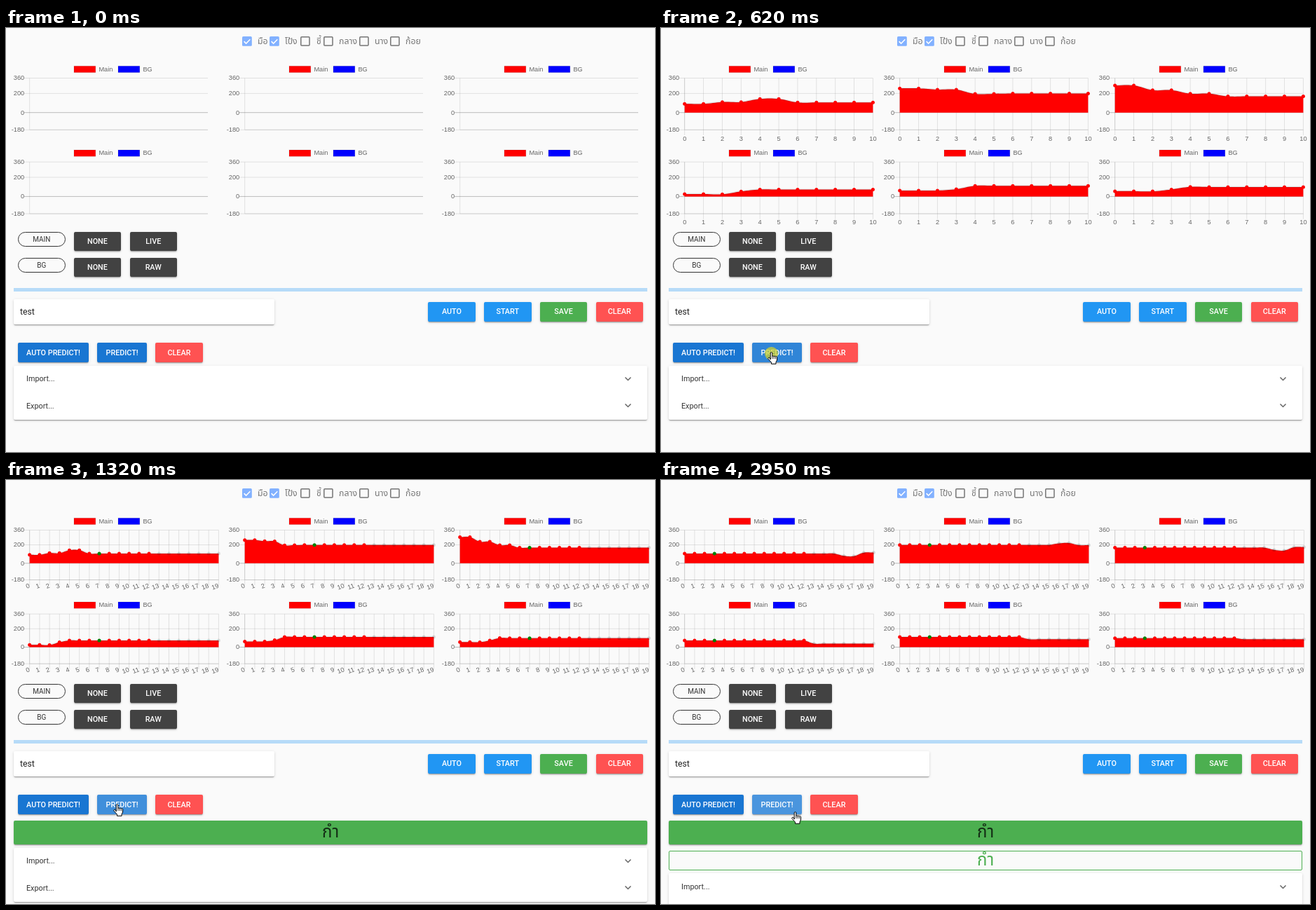
Animation of 926x605 px, one loop 3000 ms. Source, as an HTML page with a canvas:

```html
<!DOCTYPE html>
<html lang="th">
<head>
<meta charset="utf-8">
<title>Gesture prediction panel</title>
<style>
html, body { margin: 0; width: 926px; height: 605px; overflow: hidden; background: #fafafa; }
body { position: relative; font-family: Roboto, 'Noto Sans Thai', 'Noto Sans', sans-serif; }
canvas, svg, .b { position: absolute; left: 0; top: 0; }
.b { box-sizing: border-box; display: flex; align-items: center; justify-content: center; white-space: nowrap; }
.btn { border-radius: 2px; color: #fff; font-weight: 500; font-size: 10.8px; }
.up { box-shadow: 0 2px 1px -1px rgba(0,0,0,.2), 0 1.5px 1.5px rgba(0,0,0,.14), 0 1px 4px rgba(0,0,0,.12); }
.chip { border: 1px solid #333; border-radius: 11px; color: #333; font-size: 10px; }
.card { background: #fff; border-radius: 2px; }
.left { justify-content: flex-start; }
.thai { font-size: 12.3px; color: #757575; }
.item { font-size: 10.8px; color: rgba(0,0,0,.8); }
.alert { font-size: 24px; border-radius: 2px; }
</style>
</head>
<body>
<canvas id="charts" width="926" height="290"></canvas>
<script>
const LOOP = 3000;
const NS = 'http://www.w3.org/2000/svg';

// ---------- static interface ----------
function box(x, y, w, h, cls, text = '', css = '', parent = document.body) {
  const el = document.createElement('div');
  el.className = 'b ' + cls;
  el.textContent = text;
  el.style.cssText = `left:${x}px;top:${y}px;width:${w}px;height:${h}px;${css}`;
  parent.append(el);
  return el;
}
function svg(x, y, w, h, body, parent = document.body) {
  const el = document.createElementNS(NS, 'svg');
  el.setAttribute('width', w);
  el.setAttribute('height', h);
  el.style.cssText = `left:${x}px;top:${y}px;overflow:visible`;
  el.innerHTML = body;
  parent.append(el);
  return el;
}
const button = (x, y, w, text, color) => box(x, y, w, 27.7, 'btn up', text, `background:${color}`);

const checks = [[337, 359, 'มือ'], [376, 398, 'โป้ง'], [420, 443, 'ชี้'],
  [452.5, 475, 'กลาง'], [504, 526, 'นาง'], [547.5, 570, 'ก้อย']];
checks.forEach(([x, tx, label], i) => {
  svg(x, 12.3, 14, 14, i < 2
    ? '<rect width="13.8" height="13.8" rx="1.6" fill="#82b1ff"/><path d="M2.6 7.1l3 3 5.7-5.8" fill="none" stroke="#fff" stroke-width="1.5"/>'
    : '<rect x=".8" y=".8" width="12.2" height="12.2" rx="1" fill="none" stroke="#757575" stroke-width="1.5"/>');
  box(tx, 9, 40, 20, 'thai left', label);
});

box(17, 291, 67.5, 21, 'chip', 'MAIN');
box(17, 328, 67.5, 21, 'chip', 'BG');
button(96.7, 290.8, 67.5, 'NONE', '#424242');
button(176.5, 290.8, 67.5, 'LIVE', '#424242');
button(96.7, 327.6, 67.5, 'NONE', '#424242');
button(176.5, 327.6, 67.5, 'RAW', '#424242');
box(10.8, 370.6, 904.6, 5.4, '', '', 'background:#b6dbf8');
box(10.8, 387, 372, 36.4, 'card up left', 'test', 'padding-left:9.2px;font-size:12.3px;color:rgba(0,0,0,.87)');
button(602.2, 391, 67.5, 'AUTO', '#2196f3');
button(682, 391, 67.5, 'START', '#2196f3');
button(761.8, 391, 67.5, 'SAVE', '#4caf50');
button(841.5, 391, 67.5, 'CLEAR', '#ff5252');
button(16.8, 449.3, 101.4, 'AUTO PREDICT!', '#1976d2');
const predict = button(130.3, 449.3, 70.6, 'PREDICT!', '#1976d2');
button(213.2, 449.3, 67.5, 'CLEAR', '#ff5252');

const solid = box(10.8, 486.4, 904.6, 33.6, 'alert up', 'กำ', 'background:#4caf50;color:rgba(0,0,0,.75)');
const outline = box(10.8, 529.4, 904.6, 27.4, 'alert', 'กำ', 'border:1px solid #4caf50;color:#4caf50');
const panel = box(10.8, 481.6, 904.6, 77, 'card up');
['Import...', 'Export...'].forEach((text, i) => {
  box(18.2, i * 38.4, 200, 38.4, 'item left', text, '', panel);
  svg(872.4, 16.2 + i * 38.4, 9, 6, '<path d="M.5.5l4 4 4-4" fill="none" stroke="#666" stroke-width="1.5"/>', panel);
});

const ring = box(147.5, 454.5, 19, 19, '', '', 'border-radius:50%;background:rgba(214,212,40,.72)');
const hand = svg(0, 0, 15, 19,
  '<path d="M4.2 11V2a1.3 1.3 0 0 1 2.6 0V6.6a1.2 1.2 0 0 1 2.3.3 1.2 1.2 0 0 1 2.3.4 1.1 1.1 0 0 1 2.1.5V12L12 14.8V17.3H5.5V15.2L1 10.2a1.3 1.3 0 0 1 1.9-1.7Z" fill="#fff" stroke="#000" stroke-linejoin="round"/>' +
  '<path d="M6.8 6.6V10M9.1 7V10M11.4 7.4V10" stroke="#000" stroke-width=".8"/>');

// ---------- charts ----------
const ctx = document.getElementById('charts').getContext('2d');
// head: opening samples, the last one holds; tail: later samples from index `from`
const series = [
  { head: [91, 91, 110, 110, 142, 142, 105], from: 30, tail: [80, 76, 114, 116] },
  { head: [252, 252, 240, 239, 195, 196, 199], from: 30, tail: [215, 220, 197, 196] },
  { head: [283, 283, 234, 234, 197, 197, 169], from: 30, tail: [145, 138, 174, 176] },
  { head: [25, 25, 23, 53, 73, 72], from: 27, tail: [38] },
  { head: [62, 62, 62, 76, 111, 111], from: 27, tail: [86] },
  { head: [55, 55, 54, 73, 99, 98], from: 27, tail: [86] },
];
const last = (list, i) => list[Math.min(i, list.length - 1)];
const sample = (s, i) => i < s.from ? last(s.head, i) : last(s.tail, i - s.from);

function line(x1, y1, x2, y2, alpha = 0.1) {
  ctx.strokeStyle = `rgba(0,0,0,${alpha})`;
  ctx.lineWidth = 1;
  ctx.beginPath();
  ctx.moveTo(x1, y1);
  ctx.lineTo(x2, y2);
  ctx.stroke();
}

// Bezier handles of a smoothed line with tension 0.4
function handles(pts) {
  return pts.map((p, i) => {
    const a = pts[i - 1] || p, b = pts[i + 1] || p;
    const d1 = Math.hypot(p.x - a.x, p.y - a.y), d2 = Math.hypot(b.x - p.x, b.y - p.y);
    const k = 0.4 / (d1 + d2 || 1), dx = b.x - a.x, dy = b.y - a.y;
    return { ax: p.x - k * d1 * dx, ay: p.y - k * d1 * dy, bx: p.x + k * d2 * dx, by: p.y + k * d2 * dy };
  });
}
function trace(pts) {
  const h = handles(pts);
  ctx.beginPath();
  ctx.moveTo(pts[0].x, pts[0].y);
  for (let i = 1; i < pts.length; i++) {
    ctx.bezierCurveTo(h[i - 1].bx, h[i - 1].by, h[i].ax, h[i].ay, pts[i].x, pts[i].y);
  }
}

function legend(x, color, text) {
  ctx.fillStyle = color;
  ctx.fillRect(x, 54.3, 30.8, 9.2);
  ctx.strokeStyle = 'rgba(0,0,0,.1)';
  ctx.strokeRect(x, 54.3, 30.8, 9.2);
  ctx.fillStyle = '#666';
  ctx.textAlign = 'left';
  ctx.fillText(text, x + 35.4, 59.2);
}

function chart(s, n, shift, green) {
  const turned = n > 19;
  const left = 33.7, top = 71.5, bottom = turned ? 142.5 : 145.3;
  const right = !n ? 288 : turned ? 303.4 : n > 10 ? 302.4 : 305.5;
  const Y = v => bottom - (v + 180) / 540 * (bottom - top);
  const X = i => left + i * (right - left) / (n - 1);

  ctx.font = "9.23px 'Liberation Sans', Arial, sans-serif";
  ctx.textBaseline = 'middle';
  legend(97, '#f00', 'Main');
  legend(160, '#00f', 'BG');

  for (const v of [360, 200, 0, -180]) {
    line(left - 7.7, Y(v), right, Y(v), v ? 0.1 : 0.25);
    ctx.fillStyle = '#666';
    ctx.textAlign = 'right';
    ctx.fillText(v, left - 7.5, Y(v) + 0.3);
  }
  line(left, top, left, bottom);
  line(left, bottom, right, bottom);
  if (!n) return;

  for (let i = 0; i < n; i++) {
    line(X(i), top, X(i), bottom + 7.7);
    ctx.fillStyle = '#666';
    ctx.save();
    ctx.translate(X(i), turned ? 150.8 : 158);
    if (turned) ctx.rotate(-21 * Math.PI / 180);
    ctx.textAlign = turned ? 'right' : 'center';
    ctx.fillText(i, 0, 0);
    ctx.restore();
  }

  const pts = Array.from({ length: n }, (_, i) => ({ x: X(i), y: Y(sample(s, i + shift)) }));
  trace(pts);
  ctx.lineTo(right, Y(0));
  ctx.lineTo(left, Y(0));
  ctx.fillStyle = '#f00';
  ctx.fill();
  trace(pts);
  ctx.strokeStyle = 'rgba(0,0,0,.1)';
  ctx.lineWidth = 2.3;
  ctx.stroke();
  pts.forEach((p, i) => {
    ctx.fillStyle = i === green ? '#008000' : i > 12 ? 'rgba(0,0,0,.12)' : '#f00';
    ctx.beginPath();
    ctx.arc(p.x, p.y, 2.5, 0, 7);
    ctx.fill();
  });
}

// ---------- timeline: [start, value] ----------
const counts = [[0, 0], [30, 5], [120, 6], [200, 7], [250, 8], [360, 9], [480, 10]];
const shifts = [[0, 0], [1890, 1], [1940, 3], [1990, 4], [2040, 6], [2090, 7], [2440, 10],
  [2620, 11], [2730, 12], [2840, 13], [2950, 14]];
const greens = [[0, -1], [1150, 7], [2120, 6], [2220, 5], [2440, 4], [2730, 3]];
const tints = [[0, '#1976d2'], [30, '#3085d7'], [710, '#3a8bd9'], [850, '#408fdb'], [1420, '#3085d7'],
  [1630, '#4092da'], [1730, '#509add'], [1940, '#408fdb'], [2090, '#3085d7'], [2620, '#3a8bd9'], [2730, '#4a95de']];
const path = [[30, 152, 462], [1150, 152, 462], [1420, 153.5, 462], [2570, 153.5, 462], [2950, 186, 473]];

const at = (table, t) => table.filter(row => row[0] <= t).pop()[1];
const between = (t, a, b) => t >= a && t < b;
const show = (el, on) => { el.style.visibility = on ? 'visible' : 'hidden'; };

function position(t) {
  const i = path.findIndex(p => p[0] > t);
  if (i < 1) return path[i ? path.length - 1 : 0].slice(1);
  const [t0, x0, y0] = path[i - 1], [t1, x1, y1] = path[i];
  const k = (t - t0) / (t1 - t0), e = k * k * (3 - 2 * k);
  return [x0 + (x1 - x0) * e, y0 + (y1 - y0) * e];
}

function draw(t) {
  const n = t < 620 ? at(counts, t) : Math.min(20, 11 + Math.floor((t - 620) / 48.8));
  ctx.clearRect(0, 0, 926, 290);
  series.forEach((s, i) => {
    ctx.save();
    ctx.translate(i % 3 * 307, i > 2 ? 119.7 : 0);
    chart(s, n, at(shifts, t), at(greens, t));
    ctx.restore();
  });

  const first = t >= 1150, second = t >= 2090;
  show(solid, first);
  show(outline, second);
  panel.style.top = (second ? 561.4 : first ? 524.6 : 481.6) + 'px';

  predict.style.background = at(tints, t);
  predict.style.boxShadow = between(t, 1630, 1940)
    ? '0 4px 4px -1px rgba(0,0,0,.25), 0 3px 8px rgba(0,0,0,.2)' : '';
  show(ring, between(t, 620, 718) || between(t, 1580, 1680));
  show(hand, t >= 30);
  const [x, y] = position(t);
  hand.style.transform = `translate(${x}px,${y}px)`;
}

function tick() {
  draw(performance.now() % LOOP);
  requestAnimationFrame(tick);
}
tick();
</script>
</body>
</html>
```
